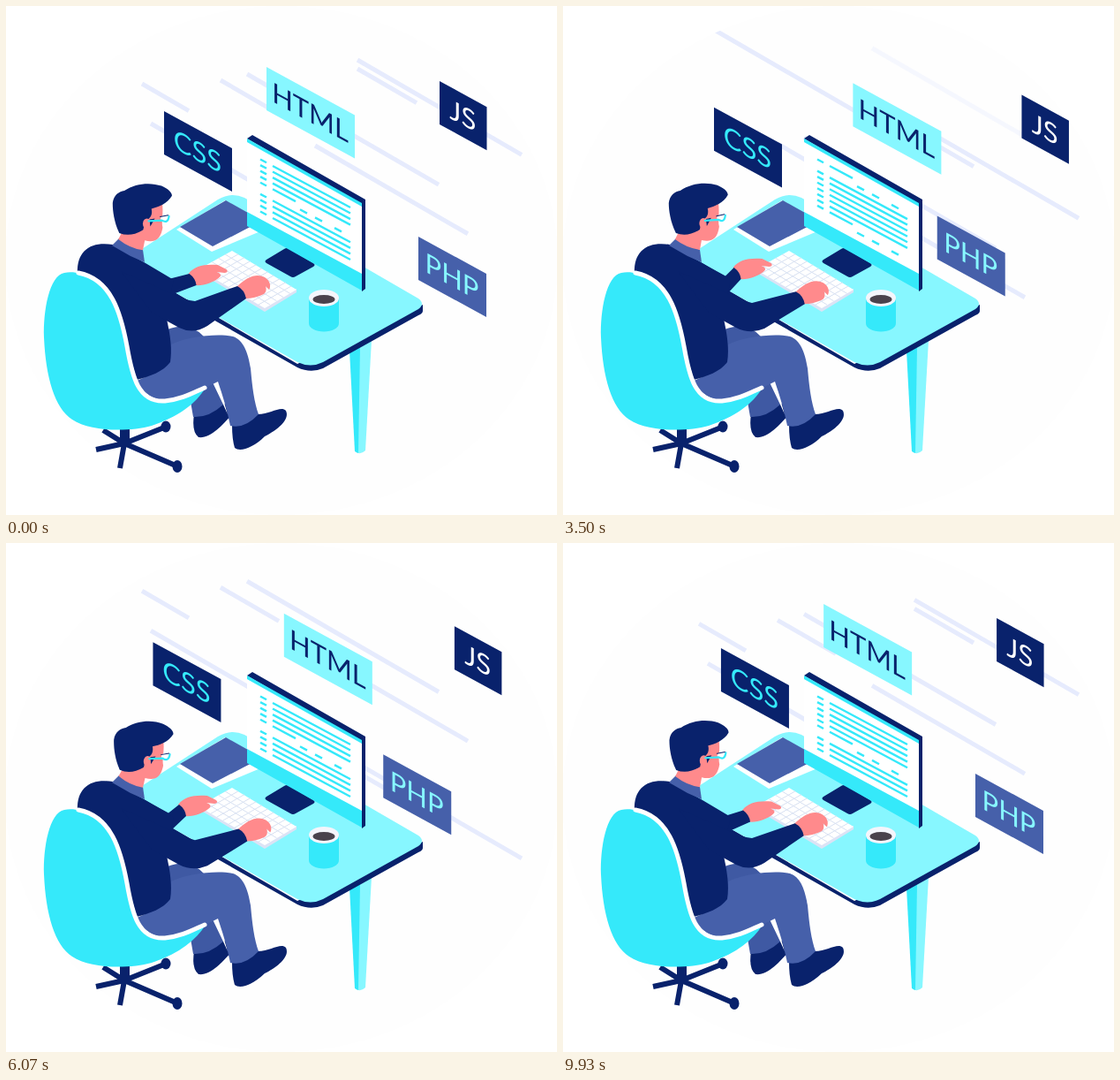
These frames come from a looping animation (624 by 576 pixels, 10000 ms). An HTML page:

```html
<!DOCTYPE html>
<html lang="en">
<head>
<meta charset="utf-8">
<title>Developer at work</title>
<style>
  html, body { margin: 0; width: 100%; height: 100%; overflow: hidden; background: #fff; }
  svg { display: block; width: 624px; height: 576px; }
  .navy { fill: #09226c; }
  .blue { fill: #4660aa; }
  .cyan { fill: #35e9fa; }
  .light { fill: #87f7ff; }
  .skin { fill: #ff8a8c; }
  .white { fill: #fff; }
  .line { fill: none; stroke-linecap: round; stroke-linejoin: round; }
  text { font: 31px Lato, sans-serif; text-anchor: middle; }
</style>
</head>
<body>
<svg viewBox="0 0 624 576">
  <clipPath id="oval"><ellipse cx="312" cy="288" rx="313" ry="288"/></clipPath>
  <g clip-path="url(#oval)">
    <rect width="624" height="576" fill="#fefefe"/>
    <g id="stripes" fill="none" stroke="#e6ebfd" stroke-width="5"></g>
    <g id="tags"></g>
  </g>

  <!-- desk -->
  <path class="light" d="M397 388L414 378L407 503Q402 508 396 505Z"/>
  <path class="cyan" d="M389 390L401 386L399 506L395 504Z"/>
  <path class="navy" d="M150 300L330 405L472 338V345Q472 348 467 350L359 410Q345 416 330 409L150 307Z"/>
  <path class="light" d="M140 284L240 219Q255 210 270 217L467 331Q475 337 467 343L359 403Q345 410 330 403L140 295Z"/>
  <path class="white" d="M193 253L248 220L300 250L233 278Z"/>
  <path class="blue" d="M197 250L249 220L290 243L234 272Z"/>
  <path fill="#dce3f5" d="M218 297L293 340L329 320V324L293 346L218 301Z"/>
  <path class="white" d="M256 277L329 321L293 342L218 298Z"/>
  <path id="keys" class="line" stroke="#d8e1f2"/>
  <path class="navy" d="M295 287L315 275Q318 273 321 275L348 291Q351 293 348 295L328 306Q325 308 322 306L295 291Q292 289 295 287Z"/>

  <!-- monitor -->
  <path class="navy" d="M273 150L279 146L407 219V320L403 323V226Z"/>
  <path class="cyan" d="M273 150L403 223V322L273 249Z"/>
  <path class="white" d="M273 154L403 227V303L273 233Z"/>
  <path id="code" fill="none" stroke="#35e9fa" stroke-width="2.4"/>

  <!-- cup -->
  <path class="cyan" d="M343 331V359A17 9.5 0 0 0 377 359V331Z"/>
  <ellipse cx="360" cy="330.5" rx="17" ry="9.5" fill="#f4f5fb"/>
  <ellipse cx="360" cy="332" rx="12.5" ry="5" fill="#4a424c"/>

  <!-- legs -->
  <path class="navy" d="M213 462L245 449Q256 453 258 460C247 472 232 490 218 488Q210 482 213 462Z"/>
  <path fill="#3f59a3" d="M183 366Q208 356 224 374L238 425L246 451Q230 466 212 465L206 430L180 410Z"/>
  <path class="white" d="M234 426L240 424L251 462L246 451Z"/>
  <path class="navy" d="M256 474Q270 476 285 462C300 462 311 452 317 458C322 468 307 480 293 487C280 500 265 505 259 500Q256 490 256 474Z"/>
  <path class="blue" d="M148 424C165 417 186 408 187 383C205 374 240 370 257 374C269 378 274 392 277 410C279 432 281 448 286 462Q270 479 254 475C250 455 245 440 240 425L222 434C195 452 160 452 148 424Z"/>

  <!-- body -->
  <path id="farHand" class="skin" d="M207 303C214 294 224 292 240 293L250 298Q253 301 248 302L239 301Q247 304 241 308C234 313 225 317 214 316Z"/>
  <path id="farArm" class="navy"/>
  <path class="navy" d="M81 302C80 276 97 266 121 270L158 291L190 310L181 350C187 375 188 390 186 403C178 414 163 419 148 423L126 345Z"/>
  <path id="nearHand" class="skin" d="M261 318C273 306 284 302 293 307C300 311 300 318 298 321L294 317Q296 323 292 326Q282 331 271 331Z"/>
  <path id="nearArm" class="navy"/>

  <!-- head -->
  <path class="blue" d="M120 271L128 263L155 276L157 290L141 283Z"/>
  <g id="head">
    <path class="skin" d="M162 228L176 222C178 234 175 243 177 250C175 263 169 268 157 265L155 276Q140 274 127 264L131 256L153 252Z"/>
    <path class="navy" d="M120 223C121 214 127 210 133 209C146 200 163 199 175 203C182 206 187 210 187 214C182 223 172 227 164 229C166 238 161 241 157 243L155 253Q141 262 128 257C122 245 120 232 120 223Z"/>
    <ellipse class="skin" cx="159" cy="246" rx="4.5" ry="6"/>
    <path class="navy" d="M162 241L168 240L163 249Z"/>
    <ellipse class="white" cx="179" cy="240" rx="4.5" ry="3.5"/>
    <path class="line" stroke="#35e9fa" stroke-width="2.2" d="M161 243L176 242Q183 246 184 237"/>
    <path class="line" stroke="#09226c" d="M174 238L183 236"/>
  </g>

  <!-- chair -->
  <path class="line" stroke="#09226c" stroke-width="6" style="stroke-linecap: butt" d="M134 495L110 480M134 495L102 502M134 495L179 477M134 495L192 520M134 495L129 523"/>
  <path class="navy" d="M129 476H140V497H129Z"/>
  <ellipse class="navy" cx="181" cy="476" rx="5.5" ry="6.5"/>
  <ellipse class="navy" cx="194" cy="521" rx="5.5" ry="7"/>
  <path class="cyan" d="M66 302C49 305 42 345 43 375C45 420 55 455 75 468C95 482 140 482 165 475C195 465 215 450 226 432C190 455 153 450 146 425C138 395 138 331 100 309C86 302 75 300 66 302Z"/>
  <path class="line" stroke="#fff" stroke-width="5" d="M82 302C119 309 130 347 137 385C143 420 150 449 180 447C200 445 213 437 225 432"/>
</svg>
<script>
const byId = id => document.getElementById(id);
const set = (el, attrs) => { for (const k in attrs) el.setAttribute(k, attrs[k]); return el; };
const add = (parent, name, attrs) =>
  parent.appendChild(set(document.createElementNS('http://www.w3.org/2000/svg', name), attrs));
const move = (id, x, y) => set(byId(id), { transform: `translate(${x} ${y})` });
const clamp = v => Math.max(0, Math.min(1, v));

// Eases 0 -> 1 -> 0 -> ... with one turn at each beat
function swing(t, beats) {
  let i = 0;
  while (i < beats.length - 2 && t > beats[i + 1]) i++;
  const p = clamp((t - beats[i]) / (beats[i + 1] - beats[i]));
  return (1 - Math.cos(Math.PI * (i + p))) / 2;
}

const evenBeats = [0, 2.5, 5, 7.5, 10];
const tags = [
  { label: 'CSS', x: 179, y: 119, w: 77, fill: '#09226c', ink: '#35e9fa', reach: -26.5, beats: [0, 1.8, 4.5, 7.75, 10] },
  { label: 'HTML', x: 295, y: 69, w: 100, fill: '#87f7ff', ink: '#09226c', reach: 51, beats: evenBeats },
  { label: 'JS', x: 491, y: 85, w: 53.5, fill: '#09226c', ink: '#fff', reach: 43.5, beats: evenBeats },
  { label: 'PHP', x: 467, y: 261, w: 77, fill: '#4660aa', ink: '#87f7ff', reach: -49, beats: [0, 4.5, 10] }
];
for (const tag of tags) {
  tag.el = add(byId('tags'), 'g', {});
  add(tag.el, 'rect', { width: tag.w, height: 49, fill: tag.fill });
  add(tag.el, 'text', { x: tag.w / 2 - .5, y: 35.5, fill: tag.ink }).textContent = tag.label;
}

// Left, right and top; one copy leaves upwards while the next arrives from below
const stripes = [
  [154, 207, 88], [243, 309, 84], [164, 338, 133], [273, 490, 77], [350, 523, 158], [398, 584, 61], [398, 465, 71]
].map(([left, right, top]) => {
  const drop = (right - left) * .577;
  const copy = () => add(byId('stripes'), 'path', { d: `M${left} 0L${right} ${drop}` });
  return { left, right, top, drop, leaving: copy(), arriving: copy() };
});

function drawStripes(t) {
  for (const s of stripes) {
    const up = s.top - 31.5 * t, down = s.top + 48 * (5 - t);
    const ceiling = Math.min(45, (s.left - 200) / 3.5);
    const floor = Math.min(375, s.right * .65 + 55);
    set(s.leaving, { transform: `translate(0 ${up})`, opacity: clamp((up - ceiling) / 12) });
    set(s.arriving, { transform: `translate(0 ${down})`, opacity: clamp((floor - down - s.drop) / 8) });
  }
}

function drawKeys() {
  let d = '';
  for (let i = 1; i < 5; i++) d += `M${256 - 7.6 * i} ${277 + 4.2 * i}l73 44`;
  for (let i = 1; i < 11; i++) d += `M${256 + 6.7 * i} ${277 + 4 * i}l-37 21`;
  set(byId('keys'), { d });
}

// Every eighth line is short and is followed by a broken one
function drawCode(shift) {
  let d = '';
  for (let row = 0; row < 10; row++) {
    const y = 181 + row * 6.55;
    const bar = (a, b) => { d += `M${a} ${y + (a - 302) * .534}L${b} ${y + (b - 302) * .534}`; };
    const kind = (row + shift + 4) % 8;
    if (kind !== 1) bar(288, 295);
    if (kind === 1) for (const x of [333, 350, 372]) bar(x, x + 8);
    else bar(302, kind ? 390 : 328);
  }
  set(byId('code'), { d });
}

function draw(ms) {
  const t = ms / 1000 % 10;
  for (const tag of tags) {
    const dx = tag.reach * swing(t, tag.beats);
    set(tag.el, { transform: `matrix(1 .545 0 1 ${tag.x + dx} ${tag.y + dx * .545})` });
  }
  drawStripes(t % 5);
  drawCode(Math.floor(t % 5 * 8));

  const nod = swing(t < 1.5 ? t + 10 : t, [1.5, 5, 6.8, 8.5, 11.5]);
  set(byId('head'), { transform: `rotate(${5.7 - 9.7 * nod} 134 278)` });

  // The hands wander over the keyboard and tap
  const arc = Math.sin(Math.PI * t / 10), tap = 1.5 * Math.sin(2 * Math.PI * t);
  const fx = tap - 16 * Math.sqrt(Math.abs(Math.sin(Math.PI * t / 5))), fy = -7 * clamp(3 * arc);
  const nx = 2 * arc - tap, ny = 7 * arc;
  move('farHand', fx, fy);
  move('nearHand', nx, ny);
  set(byId('farArm'), { d: `M150 287L184 ${309 + fy / 2}L${208 + fx} ${303 + fy}Q${215 + fx} ${308 + fy} ${216 + fx} ${316 + fy}L184 328Z` });
  set(byId('nearArm'), { d: `M130 300L180 322Q198 332 214 ${334 + ny / 3}L${262 + nx} ${317 + ny}Q${270 + nx} ${321 + ny} ${272 + nx} ${331 + ny}L228 ${362 + ny / 2}Q212 372 196 364L165 347Z` });
}

function frame(now) {
  draw(now);
  requestAnimationFrame(frame);
}
drawKeys();
requestAnimationFrame(frame);
</script>
</body>
</html>
```
